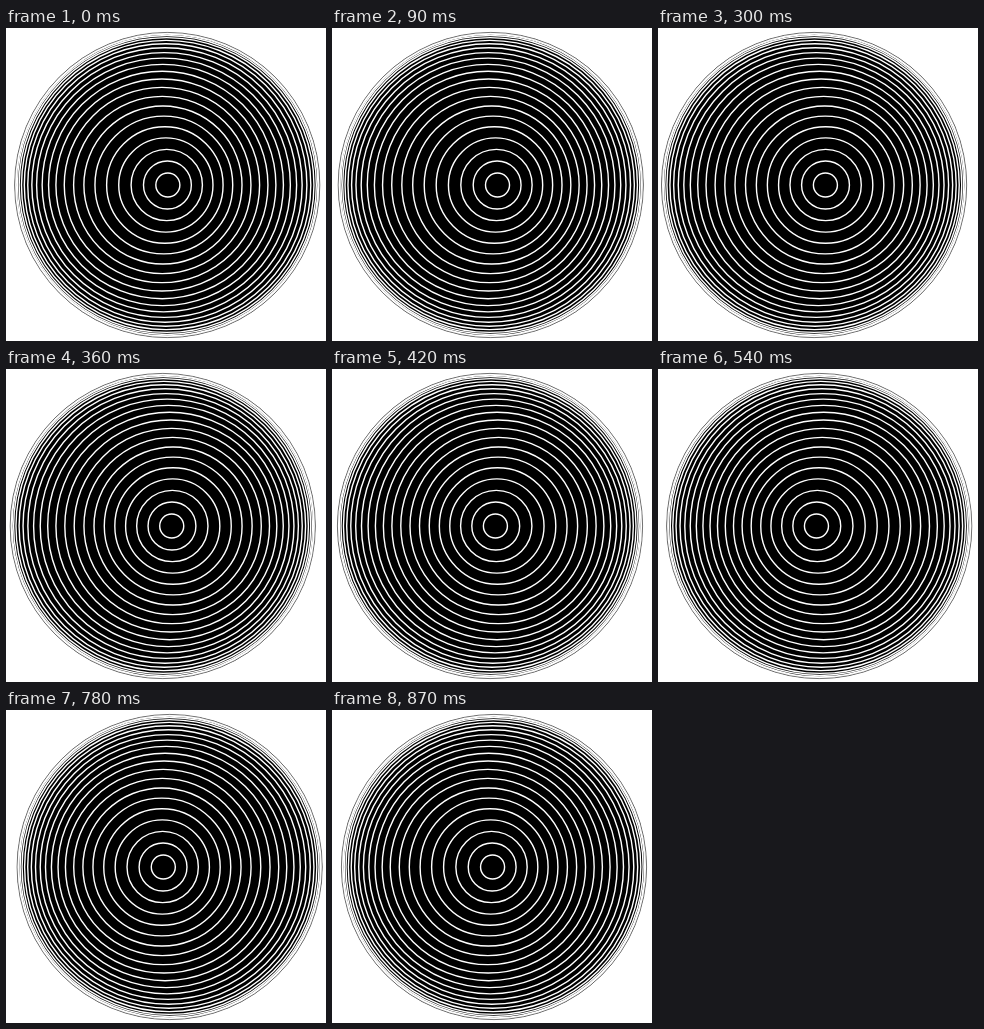
Write an HTML page with a canvas that moves like this. It is 320 px wide and 313 px high and loops after 0.9 s.

```html
<!DOCTYPE html>
<html lang="en">
<head>
<meta charset="utf-8">
<title>Ring sphere</title>
<style>
html, body { margin: 0; width: 100%; height: 100%; overflow: hidden; background: #fff; }
canvas { display: block; }
</style>
</head>
<body>
<canvas id="stage" width="320" height="313"></canvas>
<script>
const ctx = document.getElementById('stage').getContext('2d');
const LOOP = 900, STEP = 30;
const RINGS = 22, RADIUS = 152, EDGE = 152.6, CY = 157;
const EYE = 3; // viewing distance in sphere radii
const HORIZON = Math.acos(1 / EYE);
const LAG = 1.1 * Math.PI;

const mix = (a, b, u) => a + (b - a) * u;

// Latitude ring seen in perspective; the sway reaches the rim late
function ring(k, turn) {
  const a = HORIZON * k / RINGS;
  const size = Math.sqrt(EYE * EYE - 1) * Math.sin(a) / (EYE - Math.cos(a));
  const u = size * size;
  return {
    x: mix(162, 160, u) + mix(6.2, 4, u) * Math.sin(turn - LAG * u),
    r: RADIUS * size
  };
}

function circle(x, r) {
  ctx.beginPath();
  ctx.arc(x, CY, r, 0, 2 * Math.PI);
}

function draw(ms) {
  const turn = 2 * Math.PI * ms / LOOP;
  const rim = ring(RINGS, turn).x;
  ctx.fillStyle = '#fff';
  ctx.fillRect(0, 0, 320, 313);

  ctx.fillStyle = '#000';
  circle(rim, EDGE);
  ctx.fill();

  ctx.strokeStyle = '#fff';
  ctx.lineWidth = 1.4;
  for (let k = 1; k <= RINGS; k++) {
    const { x, r } = ring(k, turn);
    circle(x, r);
    ctx.stroke();
  }

  ctx.strokeStyle = '#000';
  ctx.lineWidth = 0.5;
  circle(rim, EDGE);
  ctx.stroke();
}

function tick() {
  const ms = performance.now() % LOOP;
  draw(Math.floor(ms / STEP) * STEP);
  requestAnimationFrame(tick);
}
tick();
</script>
</body>
</html>
```
